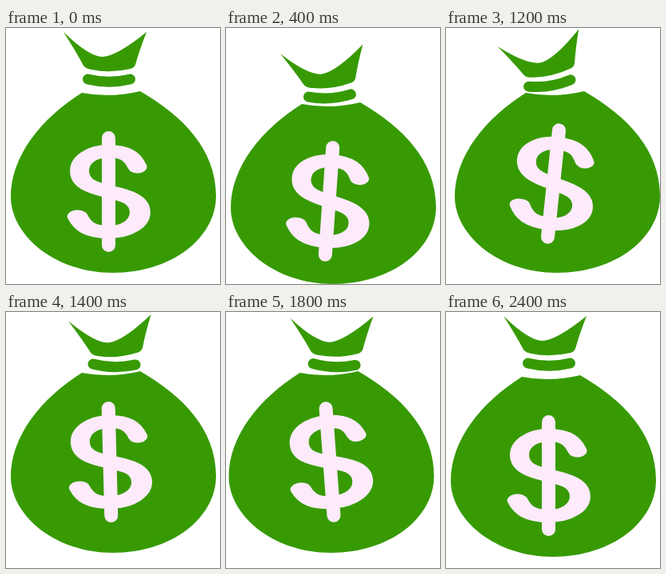
An HTML page with a canvas for the animation above (2500 ms loop, 268 by 320 pixels).

```html
<!DOCTYPE html>
<html lang="en">
<head>
<meta charset="utf-8">
<title>Money bag</title>
<style>
html, body { margin: 0; width: 100%; height: 100%; overflow: hidden; background: #fff; }
canvas { display: block; }
</style>
</head>
<body>
<canvas id="stage" width="268" height="320"></canvas>
<script>
const ctx = document.getElementById('stage').getContext('2d');
const GREEN = '#379a03', PINK = '#fdeafa';
const LOOP = 2500, STEP = 100, BEAT = 400, LAST_BEAT = 6;

const bag = new Path2D('M95 81Q131 88 168 79C222 110 263 152 263 210C263 262 208 306 134 306' +
  'C60 306 6 258 6 211C6 160 44 113 95 81Z');
const ruffle = new Path2D('M72 5Q104 36 121 36Q139 35 176 5Q167 28 162 46Q160 50 156 51' +
  'Q130 57 107 52Q100 51 97 47Q88 30 72 5Z');
const band = new Path2D('M102.5 64Q129 70.5 155.5 64');
const bar = new Path2D('M0 -67V67');
const hook = new Path2D('M0 0C-14 -5 -24.3 -10 -24.3 -26C-24.3 -40 -14 -50.5 0 -50.5C14 -50.5 20 -44 24 -31');

// Heights on each beat; the bag and its neck bounce separately
const bagY = [0, 14, 9, 0, -10, 0];
const neckY = [0, 20.5, 13.5, 5, -2, 5];
const kick = (k, size) => k === 4 ? size : 1;

function stroke(path, color, width) {
  ctx.strokeStyle = color;
  ctx.lineWidth = width;
  ctx.stroke(path);
}

function fill(path) {
  ctx.fillStyle = GREEN;
  ctx.fill(path);
}

// Two hooks, one turned upside down and a little wider, form the S
function drawDollar() {
  ctx.translate(128.5, 204.5);
  stroke(bar, PINK, 17);
  for (const sx of [1.5, -1.62]) {
    ctx.save();
    ctx.scale(sx, Math.sign(sx));
    stroke(hook, PINK, 16);
    ctx.restore();
  }
}

const parts = [
  {
    pivot: [134, 200], draw: () => fill(bag),
    x: k => [0, 0, 0, 5, -5, 0][k], y: k => bagY[k], tilt: () => 0
  },
  {
    pivot: [130, 52], draw: () => fill(ruffle),
    x: k => kick(k, 18), y: k => neckY[k], tilt: k => [0, -6.5, -7, -12, 3, -5.5][k]
  },
  {
    pivot: [129, 65.5], draw: () => stroke(band, GREEN, 13),
    x: k => kick(k, 12), y: k => neckY[k], tilt: k => [0, -3.5, -9, -9, 11, -7][k]
  },
  {
    pivot: [128.5, 204.5], draw: drawDollar,
    x: k => [0, 0.5, -6, 6, -3, 6][k],
    y: k => bagY[k] + 4 * Math.abs(k - 4) - 14,
    tilt: k => [0, 4, -3, 6, -9, 0.5][k]
  }
];

// Every part rests at both ends of the loop and moves evenly between beats
function between(channel, beat) {
  const at = k => k > 0 && k < LAST_BEAT ? channel(k) : 0;
  const k = Math.floor(beat);
  return at(k) + (at(k + 1) - at(k)) * (beat - k);
}

function drawPart(part, beat) {
  const [px, py] = part.pivot;
  ctx.save();
  ctx.translate(px + between(part.x, beat), py + between(part.y, beat));
  ctx.rotate(between(part.tilt, beat) * Math.PI / 180);
  ctx.translate(-px, -py);
  part.draw();
  ctx.restore();
}

function frame() {
  const time = Math.floor(performance.now() % LOOP / STEP) * STEP;
  ctx.clearRect(0, 0, 268, 320);
  for (const part of parts) drawPart(part, time / BEAT);
  requestAnimationFrame(frame);
}

ctx.lineCap = 'round';
frame();
</script>
</body>
</html>
```
